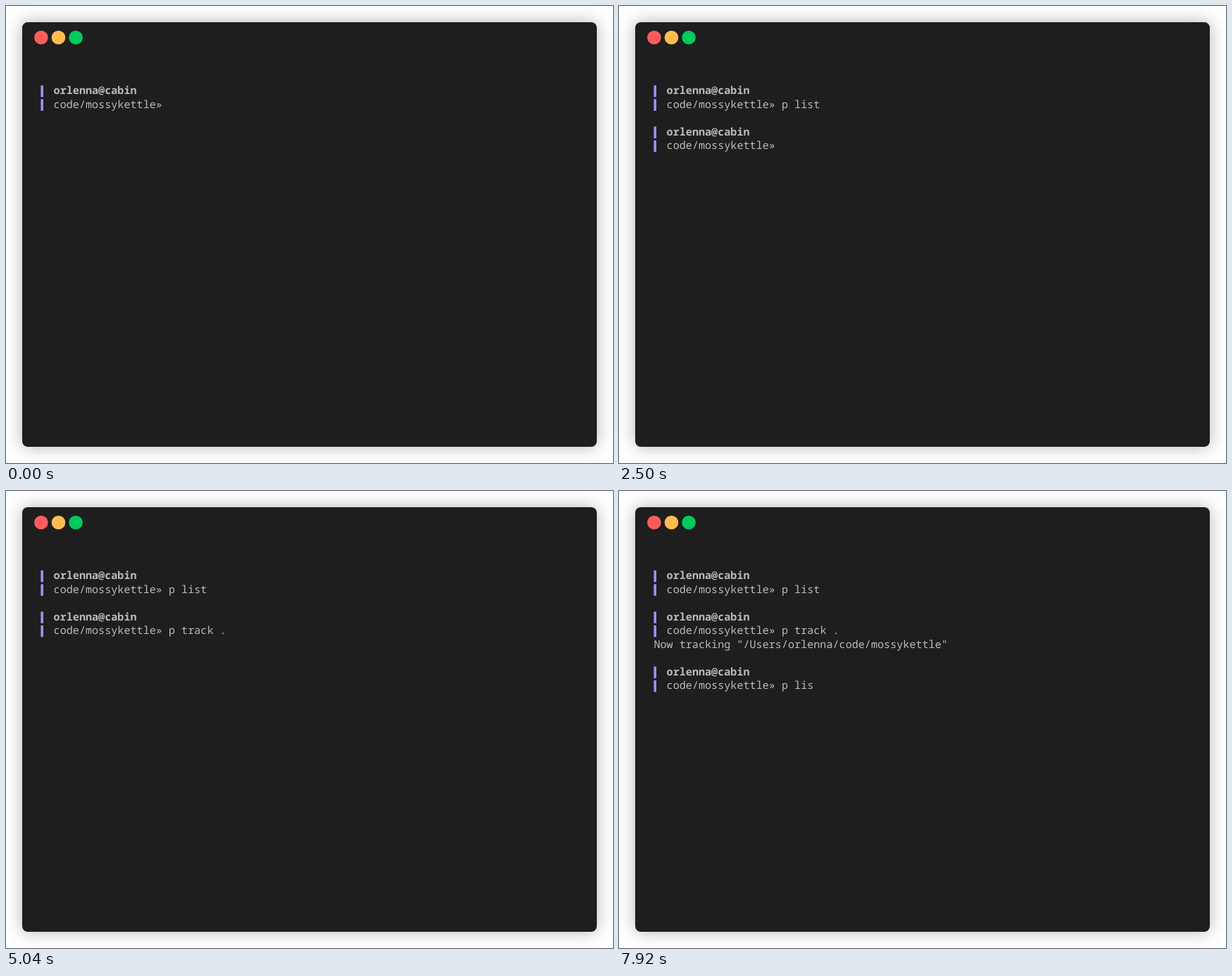
Recreate the animation shown at these times as an HTML page. Size 862 by 649 pixels, loop 8000 ms.

```html
<!DOCTYPE html>
<html lang="en">
<head>
<meta charset="utf-8">
<title>Terminal session</title>
<style>
  html, body { margin: 0; width: 100%; height: 100%; overflow: hidden; background: #fff; }
  .window {
    position: absolute; left: 23px; top: 23px; width: 816px; height: 603px;
    border-radius: 8px; background: #1e1e1e; box-shadow: 0 0 24px rgba(0, 0, 0, .3);
  }
  svg { position: absolute; left: 0; top: 0; }
  text {
    font: 15.14px "Noto Sans Mono", "DejaVu Sans Mono", monospace;
    fill: #bbb; white-space: pre; text-rendering: geometricPrecision;
  }
  .bold { font-weight: 700; }
  .bar { fill: #a78bfa; }
</style>
</head>
<body>
<div class="window"></div>
<svg width="862" height="649">
  <circle cx="49.9" cy="44.8" r="9.8" fill="#ff5c5c"/>
  <circle cx="74.5" cy="44.8" r="9.8" fill="#ffbd4f"/>
  <circle cx="99.1" cy="44.8" r="9.8" fill="#00cb5c"/>
</svg>
<script>
const LOOP = 8000, LEFT = 49.4, INDENT = 67.6;
const USER = 'orlenna', HOST = 'cabin', DIR = 'code/mossykettle';
const svg = document.querySelector('svg');
const baseline = row => 125 + row * 19.5;

function add(parent, tag, attrs, content = '') {
  const el = document.createElementNS('http://www.w3.org/2000/svg', tag);
  for (const name in attrs) el.setAttribute(name, attrs[name]);
  el.textContent = content;
  return parent.appendChild(el);
}

// Each block appears at a set time; keys holds one time per typed character.
function prompt(at, row, command, keys) {
  const group = add(svg, 'g', {});
  for (const r of [row, row + 1])
    add(group, 'rect', { class: 'bar', x: LEFT, y: baseline(r) - 12.2, width: 3.6, height: 16.5 });
  add(group, 'text', { class: 'bold', x: INDENT, y: baseline(row) }, `${USER}@${HOST}`);
  const line = add(group, 'text', { x: INDENT, y: baseline(row + 1) });
  return { at, group, line, command, keys };
}

function output(at, row, content) {
  const group = add(svg, 'g', {});
  add(group, 'text', { x: LEFT, y: baseline(row) }, content);
  return { at, group };
}

const blocks = [
  prompt(0, 0, 'p list', [1000, 1380, 1380, 1560, 1650, 1820]),
  prompt(2500, 3, 'p track .', [3500, 3930, 3930, 4140, 4260, 4540, 4640, 5040, 5040]),
  output(6110, 5, `Now tracking "/Users/${USER}/${DIR}"`),
  prompt(6110, 7, 'p lis', [7110, 7630, 7630, 7820, 7920])
];

const start = performance.now();
function draw() {
  const t = (performance.now() - start) % LOOP;
  for (const { at, group, line, command, keys } of blocks) {
    group.style.display = t >= at ? '' : 'none';
    if (line) {
      const typed = keys.filter(key => key <= t).length;
      line.textContent = `${DIR}» ${command.slice(0, typed)}`;
    }
  }
  requestAnimationFrame(draw);
}
draw();
</script>
</body>
</html>
```
